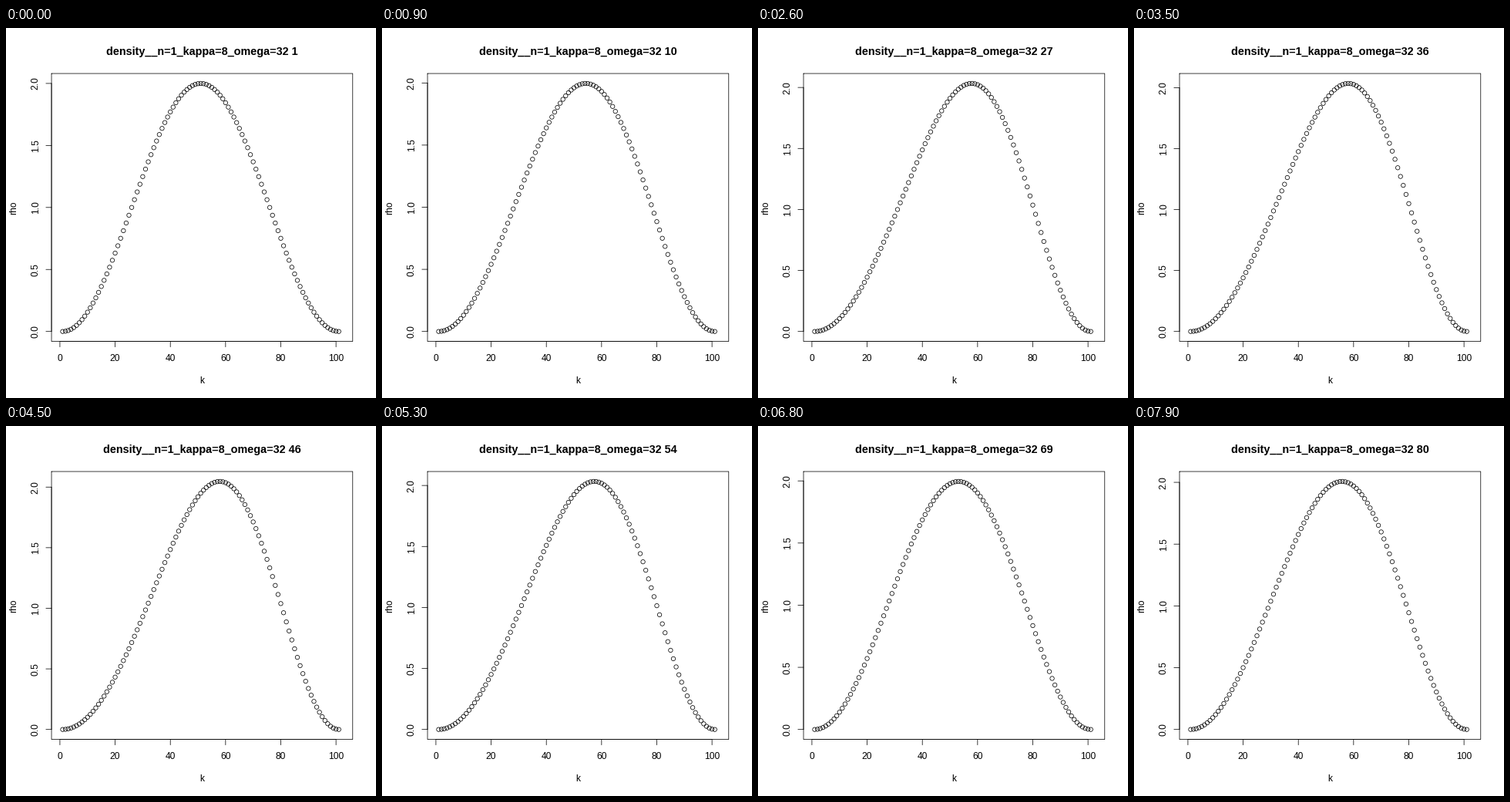
Recreate the animation shown at these times as a matplotlib script. Size 480 by 480 pixels, loop 8 s.

```python
import numpy as np
import matplotlib.pyplot as plt
from matplotlib.animation import FuncAnimation

SIZE, DPI = 480, 100
PX = 72 / DPI                       # one pixel in points
THIN = 0.75 * PX
FRAMES, INTERVAL = 80, 100
LEFT, RIGHT, TOP, BOTTOM = 59.04, 449.76, 59.04, 406.56
FONT = "Liberation Sans"

# Strength of the two density modes at a few times
KEY_T = np.array([0, 18, 35, 45, 60, 68, 79])
SKEW = np.array([0, .091, .1095, .109, .078, .0325, .0727])
SPREAD = np.array([0, .0230, .0336, .0255, .0207, .0065, .0185])

k = np.arange(1, 102)
u = np.pi * ((k - 1) / 100 - 0.5)


def spline(t, values):
    """Cubic Hermite curve through the key values."""
    slope = np.gradient(values, KEY_T)
    i = min(np.searchsorted(KEY_T, t, side="right") - 1, len(KEY_T) - 2)
    h = KEY_T[i + 1] - KEY_T[i]
    s = (t - KEY_T[i]) / h
    return ((1 + 2 * s) * (1 - s) ** 2 * values[i]
            + s * (1 - s) ** 2 * h * slope[i]
            + s * s * (3 - 2 * s) * values[i + 1]
            + s * s * (s - 1) * h * slope[i + 1])


def density(t):
    c, q = spline(t, SKEW), spline(t, SPREAD)
    return (1 + np.cos(2 * u)
            - q * (np.cos(2 * u) + np.cos(4 * u))
            + 2 * c * (np.sin(u) + np.sin(3 * u)))


def x_pos(v):
    return LEFT + (v + 3.04) / 109.08 * (RIGHT - LEFT)


def y_pos(v, peak):
    return BOTTOM - (v / peak + 0.04) / 1.08 * (BOTTOM - TOP)


fig = plt.figure(figsize=(SIZE / DPI, SIZE / DPI), dpi=DPI, facecolor="white")
ax = fig.add_axes([0, 0, 1, 1])
ax.set_xlim(0, SIZE)
ax.set_ylim(SIZE, 0)
ax.axis("off")


def line(xs, ys):
    return ax.plot(xs, ys, color="black", lw=THIN, snap=False,
                   solid_capstyle="round", solid_joinstyle="round")[0]


def label(x, y, s, size=12, **kw):
    return ax.text(x, y, s, fontsize=size * PX, family=FONT, color="black",
                   ha="center", va="baseline", rotation_mode="anchor", **kw)


line([LEFT, RIGHT, RIGHT, LEFT, LEFT], [TOP, TOP, BOTTOM, BOTTOM, TOP])

# Axis lines lie over the frame
line([x_pos(0), x_pos(100)], [BOTTOM, BOTTOM])
y_axis = line([LEFT, LEFT], [0, 0])

for v in range(0, 101, 20):
    line([x_pos(v)] * 2, [BOTTOM, BOTTOM + 7.2])
    label(x_pos(v), 432.5, str(v))

y_vals = np.arange(5) / 2
y_ticks = [line([LEFT - 7.2, LEFT], [0, 0]) for _ in y_vals]
y_labels = [label(41.76, 0, f"{v:.1f}", rotation=90) for v in y_vals]

mid_x, mid_y = (LEFT + RIGHT) / 2, (TOP + BOTTOM) / 2
label(mid_x, 461.3, "k")
label(12.96, mid_y, "rho", rotation=90)
title = label(mid_x, 35, "", size=14.4, weight="bold")

dots = ax.scatter(x_pos(k), k, s=np.full(k.size, (5.4 * PX) ** 2),
                  facecolors="none", edgecolors="black", linewidths=THIN,
                  snap=False, zorder=3)


def update(i):
    rho = density(i)
    peak = rho.max()
    dots.set_offsets(np.column_stack([x_pos(k), y_pos(rho, peak)]))
    y_axis.set_ydata([y_pos(0, peak), y_pos(2, peak)])
    for v, tick, text in zip(y_vals, y_ticks, y_labels):
        y = y_pos(v, peak)
        tick.set_ydata([y, y])
        text.set_y(y)
    title.set_text(f"density__n=1_kappa=8_omega=32 {i + 1}")
    return [dots, title, y_axis, *y_ticks, *y_labels]


anim = FuncAnimation(fig, update, frames=FRAMES, interval=INTERVAL,
                     repeat=True, repeat_delay=0, blit=False)
plt.show()
```
